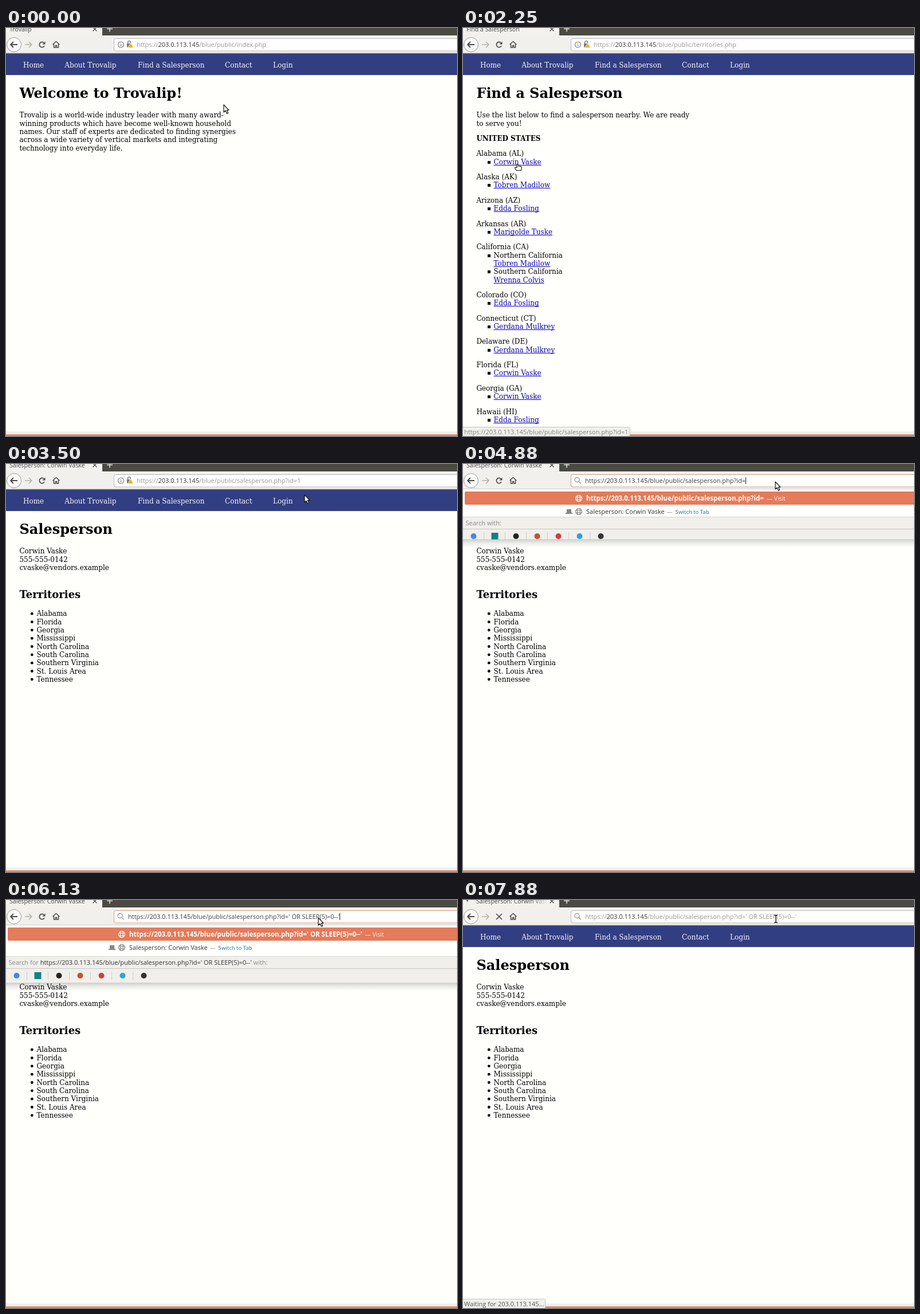
Recreate the animation shown at these times as an HTML page with a canvas. Size 787 px wide and 712 px high, loop 8 s.

```html
<!DOCTYPE html>
<html lang="en">
<head>
<meta charset="utf-8">
<title>Browser session</title>
<style>
html, body { margin: 0; width: 100%; height: 100%; overflow: hidden; background: #fffffb; }
canvas { display: block; }
</style>
</head>
<body>
<canvas id="stage" width="787" height="712"></canvas>
<script>
const c = document.getElementById('stage').getContext('2d');
const W = 787, H = 712, LOOP = 8000, STEP = 125;
const LINE = 14.33, GAP = 26.4, TOP = 156.2;
const HOST = '203.0.113.145', PATH = '/blue/public/';
const FIRM = 'Trovalip', REP = 'Corwin Vaske';
const INJECT = "' OR SLEEP(5)=0--'";
const serif = (px = 12, weight = 400) => `${weight} ${px}px "DejaVu Serif", serif`;
const sans = (px = 11, weight = 400) => `${weight} ${px}px "Open Sans", sans-serif`;

// Draws text on a whole-pixel baseline and returns where it ends.
function text(str, x, y, color = '#000', font = sans()) {
  c.font = font;
  c.fillStyle = color;
  c.fillText(str, x, Math.round(y));
  return x + c.measureText(str).width;
}
function rect(x, y, w, h, color) {
  c.fillStyle = color;
  c.fillRect(x, y, w, h);
}
function box(x, y, w, h, r, fill, stroke) {
  c.beginPath();
  c.roundRect(x, y, w, h, r);
  c.fillStyle = fill;
  c.fill();
  if (stroke) { c.strokeStyle = stroke; c.lineWidth = 1; c.stroke(); }
}
function disc(x, y, r, fill, stroke) {
  c.beginPath();
  c.arc(x, y, r, 0, 7);
  c.fillStyle = fill;
  c.fill();
  if (stroke) { c.strokeStyle = stroke; c.lineWidth = 1; c.stroke(); }
}
function path(d, x, y, stroke, width = 1, fill) {
  const p = new Path2D(d);
  c.save();
  c.translate(x, y);
  c.lineJoin = 'round';
  if (fill) { c.fillStyle = fill; c.fill(p); }
  if (stroke) { c.strokeStyle = stroke; c.lineWidth = width; c.stroke(p); }
  c.restore();
}

// ---- Web pages ----
const heading = str => text(str, 23.4, 122, '#000', serif(24, 700));
const line = (str, y, x = 23.4) => text(str, x, y, '#000', serif());
const lines = (list, y, x) => list.forEach((s, i) => line(s, y + i * LINE, x));

function link(str, y) {
  const end = text(str, 53.5, y, '#0a02b8', serif());
  rect(53.5, Math.round(y) + 1, end - 53.5, 1, '#0a02b8');
}

function homePage() {
  heading(`Welcome to ${FIRM}!`);
  lines([`${FIRM} is a world-wide industry leader with many award-`,
    'winning products which have become well-known household',
    'names. Our staff of experts are dedicated to finding synergies',
    'across a wide variety of vertical markets and integrating',
    'technology into everyday life.'], TOP);
}

const [ROB, IRE, LIZ, SHE, BAR] =
  ['Tobren Madilow', 'Edda Fosling', 'Marigolde Tuske', 'Wrenna Colvis', 'Gerdana Mulkrey'];
const STATES = [
  ['Alabama (AL)', REP], ['Alaska (AK)', ROB], ['Arizona (AZ)', IRE], ['Arkansas (AR)', LIZ],
  ['California (CA)', ROB, SHE], ['Colorado (CO)', IRE], ['Connecticut (CT)', BAR],
  ['Delaware (DE)', BAR], ['Florida (FL)', REP], ['Georgia (GA)', REP], ['Hawaii (HI)', IRE]];

function listPage() {
  heading('Find a Salesperson');
  lines(['Use the list below to find a salesperson nearby. We are ready', 'to serve you!'], TOP);
  let y = TOP + LINE + GAP;
  text('UNITED STATES', 23.4, y, '#000', serif(12, 700));
  for (const [state, ...reps] of STATES) {
    line(state, y += GAP);
    reps.forEach((rep, i) => {
      rect(43, Math.round(y + LINE) - 6, 5, 5, '#000');
      if (reps.length > 1) line(['Northern', 'Southern'][i] + ' California', y += LINE, 53.5);
      link(rep, y += LINE);
    });
  }
}

function repPage() {
  heading('Salesperson');
  lines([REP, '555-555-0142', 'cvaske@vendors.example'], TOP);
  text('Territories', 23.4, 234, '#000', serif(18, 700));
  const areas = ['Alabama', 'Florida', 'Georgia', 'Mississippi', 'North Carolina',
    'South Carolina', 'Southern Virginia', 'St. Louis Area', 'Tennessee'];
  lines(areas, 265.2, 53.5);
  areas.forEach((_, i) => disc(45.3, 261.2 + i * LINE, 2.4, '#000'));
}

const PAGES = [
  { title: FIRM, file: 'index.php', draw: homePage, at: -9999 },
  { title: 'Find a Salesperson', file: 'territories.php', draw: listPage, at: 1125 },
  { title: 'Salesperson: ' + REP, file: 'salesperson.php?id=1', draw: repPage, at: 2750 }];

function navBar() {
  rect(0, 44.3, W, 37.8, '#323e82');
  const items = { Home: 30, ['About ' + FIRM]: 102.3, 'Find a Salesperson': 230, Contact: 382, Login: 466 };
  for (const name in items) text(name, items[name], 69, '#f4f4fa', serif());
}

// ---- Browser frame ----
function tabStrip(t, page, loading) {
  rect(0, 0, W, 13, '#4b4a42');
  rect(0, 0, 168, 14, '#f2f1ee');
  const age = t - page.at;
  if (age >= 0 && age < 500) {
    c.globalAlpha = age < 250 ? 1 : 1 - (age - 125) / 375;
    rect(0, 0, Math.min(168, 50 + age * 0.456), 13, '#cfe0f4');
    c.globalAlpha = 1;
  }
  let color = '#4c4c4c';
  if (loading) {
    color = c.createLinearGradient(122, 0, 147, 0);
    color.addColorStop(0, '#4c4c4c');
    color.addColorStop(1, '#4c4c4c00');
    disc(11.5 - 4 * Math.cos((t - 7875) / 1000 * Math.PI * 2), 1.3, 1.6, '#777');
  }
  text(page.title, loading ? 23 : 6, 6, color, sans(10.6));
  path('M-3.5-3.5L3.5 3.5M3.5-3.5L-3.5 3.5', 155, 2, '#555', 1.4);
  path('M-5 0H5M0-5V5', 181, 1.5, '#ddd', 1.6);
}

function toolbar(loading, stopDim) {
  rect(0, 13, W, 32, '#f1f0ec');
  rect(168, 13, W, 1, '#fafaf8');
  rect(0, 43, W, 1, '#d0cfca');
  const ink = '#4a4a48', dim = '#b5b5b0';
  disc(14, 29, 12.5, '#fbfbf9', '#9a9a96');
  path('M-6 0H6M-1-5L-6 0L-1 5', 14, 29, ink, 1.8);
  path('M-6 0H6M1-5L6 0L1 5', 39, 29, dim, 1.7);
  if (loading || stopDim) path('M-5-5L5 5M5-5L-5 5', 63, 29, stopDim ? dim : ink, 1.6);
  else {
    path('M4 2.2A4.6 4.6 0 1 1 3.2-3.2', 63, 29, ink, 1.7);
    path('M5.5-5.5V-.5H.5Z', 63, 29, null, 0, ink);
  }
  path('M-6 0L0-5.5L6 0M-4-1V5H-1V1.5H1V5H4V-1', 87.5, 29, ink, 1.5);
}

function address(file, focused, typed) {
  box(188.5, 18.5, 620, 21.5, 3, '#fff', focused ? '#d99a80' : '#b9b8b3');
  let x = 213;
  if (typed) {
    path('M2 2L6 6M3-1A4 4 0 1 1-5-1A4 4 0 1 1 3-1', 200, 28.5, '#a0a0a0', 1.5);
  } else {
    path('M5 0A5 5 0 1 1-5 0A5 5 0 1 1 5 0M0-.8V3M0-3V-1.8', 200.5, 29, '#777', 1.1);
    path('M-2.4-1V-3A2.4 2.4 0 0 1 2.4-3V-1', 215, 28, '#777', 1.4);
    rect(211, 27, 8, 6.5, '#777');
    path('M0-4.5L5 4H-5Z', 217.5, 30.5, '#fff', 0.8, '#eeb211');
    x = 228;
  }
  const soft = focused ? '#404040' : '#999';
  x = text('https://', x, 33, soft);
  x = text(HOST, x, 33, '#333');
  x = text(PATH + file, x, 33, soft);
  if (focused) rect(Math.round(x), 23, 1, 12, '#222');
}

function globe(x, y, color) {
  path('M5.5 0A5.5 5.5 0 1 1-5.5 0A5.5 5.5 0 1 1 5.5 0M2.5 0A2.5 5.5 0 1 1-2.5 0A2.5 5.5 0 1 1 2.5 0M-5-2H5M-5 2H5',
    x, y, color, 1.1);
}

function engineIcons(y) {
  const colors = ['#4285f4', '#0c8484', '#222', '#c8502e', '#d23c45', '#2aa3dc', '#333'];
  colors.forEach((color, i) => {
    const x = 18.5 + 37 * i;
    if (i === 1) rect(x - 6, y - 6, 12, 12, color);
    else disc(x, y, 5, color);
    if (i < 6) rect(x + 17.5, y - 7, 1, 14, '#cfcec9');
  });
}

function popup(t, file) {
  const injected = t >= 6125, short = t >= 6500;
  const top = t < 5500 ? 93 : short ? 86 : 99;
  const bottom = t < 5500 ? 132 : short ? 139.5 : 145;
  const url = 'https://' + HOST + PATH + file;

  const shade = c.createLinearGradient(0, bottom, 0, bottom + 14);
  shade.addColorStop(0, '#0000002c');
  shade.addColorStop(0.5, '#00000010');
  shade.addColorStop(1, '#00000000');
  rect(0, bottom, W, 14, shade);
  c.save();
  c.beginPath();
  c.rect(0, 44, W, bottom - 44);
  c.clip();
  rect(0, 44, W, top - 44, '#fffffd');
  rect(0, top, W, 100, '#f0efeb');
  rect(0, top - 1, W, 1, '#d5d4cf');
  rect(0, top + 20, W, 1, '#c6c5c0');

  box(3, 48, 800, 23, 2, '#e47b5a');
  globe(202, 60, '#fff');
  const end = text(url, 215, 64, '#fff', sans(11.5, 700));
  text('— Visit', end + 5, 64, '#fdeae3', sans(10.3));

  if (!short) {
    path('M-4-4H4V2H6V4H-6V2H-4Z', 185, 83, null, 0, '#858585');
    globe(202, 83, '#808080');
    const x = text(PAGES[2].title, 215, 87, '#333');
    text('—', x + 4, 87, '#999', sans(10));
    text('Switch to Tab', x + 19, 87, '#1474a8', sans(9.6));
  }
  let x = text('Search ', 4.5, top + 14, '#888');
  if (injected) {
    x = text('for ', x, top + 14, '#888');
    x = text(url + ' ', x, top + 14, '#333');
  }
  text('with:', x, top + 14, '#888');
  engineIcons(top + 33);
  if (short) {
    rect(0, 131, W, 1, '#cfcec9');
    c.beginPath();
    c.rect(0, 131, W, 2);
    c.clip();
    engineIcons(127);
  }
  c.restore();
  rect(0, bottom - 0.5, W, 1, '#c9c8c3');
}

function status(str, color) {
  c.font = sans();
  const w = c.measureText(str).width + 5;
  box(-2, 696.5, w + 1.5, 20, 1, '#f0f0ec', '#c4c4be');
  text(str, 2, 709, color);
}

// ---- Pointer ----
const TRACK = [[0, 380, 134], [500, 300, 72], [700, 300, 70], [875, 387, 127], [1250, 387, 127],
  [1750, 104, 241], [2250, 94, 237], [2500, 94, 237], [2750, 160, 225], [3250, 500, 141],
  [3500, 521, 54], [3750, 546, 33], [8000, 546, 33]];

function pointerAt(t) {
  const i = TRACK.findIndex(k => k[0] > t);
  const [t0, x0, y0] = TRACK[i - 1], [t1, x1, y1] = TRACK[i];
  const u = (t - t0) / (t1 - t0), e = u * u * (3 - 2 * u);
  return [x0 + (x1 - x0) * e, y0 + (y1 - y0) * e];
}

function pointer(x, y, shape) {
  if (shape === 'beam') {
    const d = 'M-3-6.5H-1L0-5.5L1-6.5H3M0-5.5V5.5M-3 6.5H-1L0 5.5L1 6.5H3';
    path(d, x, y, '#fff', 3);
    path(d, x, y, '#111', 1.4);
  } else if (shape === 'hand') {
    path('M0 1Q1.2-.5 2.2 1V4L7 4.6Q8.5 5 8.3 7L7.5 11.5H-1L-3.5 7.5Q-3.5 5.5-2 6L0 7Z',
      x, y, '#111', 1.1, '#fff');
  } else {
    path('M0 0V13L3 10.2L5.4 15.2L7.6 14.2L5.3 9.3H9Z', x, y, '#111', 1.2, '#fff');
  }
}

function draw(now) {
  const t = Math.floor(now % LOOP / STEP) * STEP;
  const page = PAGES.findLast(p => t >= p.at);
  const waiting = t >= 7000;
  const loading = waiting || (t >= 1000 && t < 1125) || (t >= 2500 && t < 2750);
  const typed = t >= 4875, open = typed && !waiting;
  const focused = t >= 3875 && !waiting;
  const file = typed ? 'salesperson.php?id=' + (t >= 6125 ? INJECT : '') : page.file;
  const [x, y] = pointerAt(t);
  const onNav = t < 1000 && y < 82 && x > 230 && x < 346;
  const onRep = t >= 2000 && t < 2625;

  rect(0, 0, W, H, '#fffffb');
  page.draw();
  tabStrip(t, page, loading);
  toolbar(loading, t - page.at >= 0 && t - page.at < 250);
  navBar();
  rect(0, 704, W, 5, '#f0f0ed');
  rect(0, 709, W, 3, '#dc8d70');
  address(file, focused, typed);
  if (open) popup(t, file);

  if (loading) status(`Waiting for ${HOST}…`, '#555');
  else if (onNav || onRep) status('https://' + HOST + PATH + PAGES[onNav ? 1 : 2].file, '#808080');

  if (open) pointer(x - 1, y - 2, 'arrow');
  else pointer(x, y, y < 43 ? 'beam' : onNav || onRep ? 'hand' : 'arrow');
}

function frame() {
  draw(performance.now());
  requestAnimationFrame(frame);
}
frame();
</script>
</body>
</html>
```
